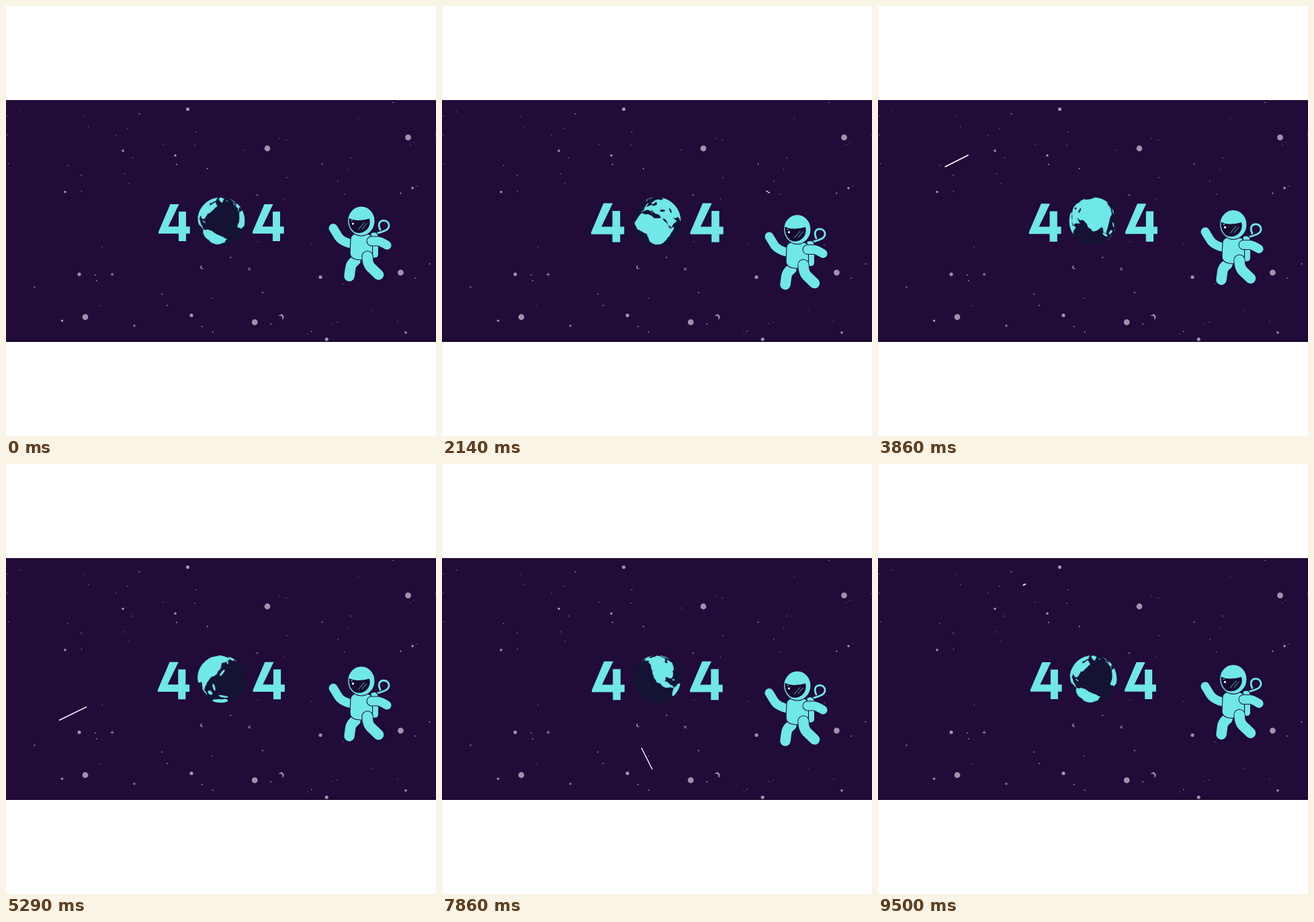
Animation, 640 px wide and 640 px high, one loop 9.57 s. Source, as an HTML page with a canvas:

```html
<!DOCTYPE html>
<html lang="en">
<head>
<meta charset="utf-8">
<title>404</title>
<style>
html, body { margin: 0; width: 100%; height: 100%; overflow: hidden; background: #fff; }
canvas { display: block; width: 640px; height: 640px; }
</style>
</head>
<body>
<canvas id="stage" width="640" height="640" role="img" aria-label="404"></canvas>
<script>
const LOOP = 9570, HALF = LOOP / 2, FPS = 14;
const SKY = '#210b38', TEAL = '#70e7e9', DARK = '#141334', GREY = '#a092ac';
const ctx = document.getElementById('stage').getContext('2d');

function layer(w, h) {
  const c = document.createElement('canvas');
  c.width = w;
  c.height = h;
  return c.getContext('2d', { willReadFrequently: true });
}
function seeded(seed) {
  return () => (seed = (seed * 16807) % 2147483647) / 2147483647;
}
const clamp = u => Math.max(0, Math.min(1, u));
const smooth = u => (u = clamp(u), u * u * (3 - 2 * u));
const mix = (p, q, k) => p.map((v, i) => v + (q[i] - v) * k);

// ---- sky ----
const sky = layer(640, 640);

function dot(g, x, y, r) {
  g.beginPath();
  g.arc(x, y, r, 0, 7);
  g.fill();
}
function cross(x, y, r, turn) {
  sky.save();
  sky.translate(x, y);
  sky.rotate(turn);
  sky.beginPath();
  sky.moveTo(-r, 0); sky.lineTo(r, 0);
  sky.moveTo(0, -r); sky.lineTo(0, r);
  sky.stroke();
  sky.restore();
}
function crescent(x, y, r, dx, dy) {
  sky.fillStyle = GREY;
  dot(sky, x, y, r);
  sky.fillStyle = SKY;
  dot(sky, x + dx, y + dy, r);
}
function paintSky() {
  sky.fillStyle = '#fff';
  sky.fillRect(0, 0, 640, 640);
  sky.fillStyle = SKY;
  sky.fillRect(0, 140, 640, 360);
  sky.fillStyle = '#1b0830';
  sky.fillRect(0, 497, 640, 3);
  sky.fillStyle = sky.strokeStyle = GREY;

  // large stars by radius
  const stars = {
    4.4: [[389, 212], [598.5, 195.7], [118, 463], [370.2, 470.6], [587.4, 396.8]],
    2.6: [[270.5, 153.5], [109, 399.3], [468, 403.5], [276, 460.4], [477.2, 496]],
    1.8: [[174, 215.5], [252, 222.5], [88, 276.7], [605, 271], [595, 486], [83.5, 468.5]]
  };
  for (const r in stars) for (const [x, y] of stars[r]) dot(sky, x, y, +r);

  const rand = seeded(404);
  for (let i = 0; i < 64; i++) dot(sky, rand() * 640, 142 + rand() * 354, .6 + .5 * rand() ** 2);

  cross(158, 399.5, 2.6, 0);
  cross(362, 391.5, 2.8, Math.PI / 4);
  cross(191, 476, 2, 0);
  crescent(409.5, 463.3, 4, -2, 1.7);
  crescent(292, 388.7, 2.7, 1.6, -.6);
}
paintSky();

// ---- globe: near perspective view of a flat map ----
const MAP_W = 1080, MAP_H = 540, SIZE = 216, RADIUS = 106;
const TILT = 27 * Math.PI / 180, EYE = 2.4, FIRST_LON = -46;
const map = layer(MAP_W, MAP_H);
const rough = seeded(77);

function mapPoint([lon, lat]) {
  const drift = 20 * Math.sin(Math.PI * clamp((lon + 20) / 240));
  return [(lon + drift + 180) * 3, (90 - lat) * 3];
}
// Splits a shore line into halves, shaking each middle point.
function shore(p, q, depth) {
  if (!depth) return [p];
  const shake = Math.hypot(q[0] - p[0], q[1] - p[1]) * .16;
  const mid = mix(p, q, .5).map(v => v + (rough() - .5) * shake * 2);
  return [...shore(p, mid, depth - 1), ...shore(mid, q, depth - 1)];
}
function land(...corners) {
  const line = corners.map(mapPoint);
  const edge = line.flatMap((p, i) => shore(p, line[(i + 1) % line.length], 2));
  for (const shift of [-MAP_W, 0, MAP_W]) {
    map.beginPath();
    for (const [x, y] of edge) map.lineTo(x + shift, y);
    map.fill();
  }
}
function spot(lon, lat, rx, ry, turn = 0) {
  map.beginPath();
  map.ellipse(...mapPoint([lon, lat]), rx * 3, ry * 3, turn, 0, 7);
  map.fill();
}
function paintMap() {
  // the Americas and Greenland
  land([-168, 66], [-158, 58], [-140, 60], [-124, 46], [-117, 32], [-105, 20], [-79, 7], [-88, 17],
    [-97, 22], [-95, 29], [-81, 26], [-75, 37], [-64, 45], [-56, 52], [-70, 62], [-80, 53],
    [-93, 59], [-68, 66], [-80, 78], [-110, 84], [-140, 70]);
  land([-44, 60], [-55, 70], [-65, 78], [-40, 84], [-20, 74]);
  land([-79, 8], [-62, 10], [-35, -7], [-48, -26], [-68, -52], [-71, -18], [-81, -5]);
  // Africa, Eurasia and Australia
  land([-6, 35], [10, 37], [20, 31], [32, 31], [43, 12], [51, 12], [40, -6], [35, -22], [20, -35],
    [12, -16], [9, 4], [-8, 5], [-17, 14]);
  land([-9, 37], [-2, 44], [-4, 48], [10, 55], [24, 56], [22, 64], [12, 56], [6, 60], [25, 71],
    [60, 71], [100, 86], [140, 82], [190, 67], [163, 60], [157, 51], [153, 59], [137, 54], [128, 39],
    [121, 31], [108, 19], [103, 3], [94, 17], [80, 10], [70, 22], [50, 29], [59, 21], [45, 13],
    [35, 30], [27, 37], [22, 38], [13, 45], [17, 39], [8, 44]);
  land([114, -22], [131, -12], [143, -12], [153, -27], [140, -38], [115, -34]);
  // islands
  spot(-2, 54, 2.4, 4.5);
  spot(-19, 65, 4, 1.7);
  spot(138, 37, 2, 7, .8);
  spot(114, 1, 4.5, 4.5);
  spot(101, 0, 2, 8, -.75);
  spot(122, 13, 2, 6, -.3);
  spot(140, -5, 9, 2.5, .35);
  spot(-79, 22, 4, 1, .3);
  // inland seas
  map.globalCompositeOperation = 'destination-out';
  spot(34, 43.5, 6, 2);
  spot(51, 42, 2.4, 4.5);
}
paintMap();

const texels = map.getImageData(0, 0, MAP_W, MAP_H).data;
const globe = layer(SIZE, SIZE), globeData = globe.createImageData(SIZE, SIZE);
const rays = [];

function castRays() {
  const spread = Math.sqrt(EYE * EYE - 1);
  for (let j = 0; j < SIZE; j++) {
    for (let i = 0; i < SIZE; i++) {
      const sx = (i + .5 - SIZE / 2) / RADIUS / spread, sy = (SIZE / 2 - j - .5) / RADIUS / spread;
      const q = 1 + sx * sx + sy * sy, root = EYE * EYE - q * (EYE * EYE - 1);
      if (root < 0) continue;
      const depth = (EYE - Math.sqrt(root)) / q;
      const x = sx * depth, y = sy * depth, z = EYE - depth;
      const lat = Math.asin(y * Math.cos(TILT) + z * Math.sin(TILT));
      const lon = Math.atan2(x, z * Math.cos(TILT) - y * Math.sin(TILT));
      const row = Math.min(MAP_H - 1, Math.floor((.5 - lat / Math.PI) * MAP_H));
      const at = (j * SIZE + i) * 4;
      rays.push([at, row * MAP_W, lon / (2 * Math.PI) * MAP_W]);
      globeData.data.set([112, 231, 233, 0], at);
    }
  }
}
castRays();

function drawGlobe(t) {
  const turn = ((FIRST_LON + 180) / 360 + t / LOOP + 1) * MAP_W;
  for (const [at, row, col] of rays) {
    globeData.data[at + 3] = texels[(row + Math.floor(turn + col) % MAP_W) * 4 + 3];
  }
  globe.putImageData(globeData, 0, 0);
  ctx.fillStyle = DARK;
  dot(ctx, 320.7, 320.3, 36);
  ctx.imageSmoothingQuality = 'high';
  ctx.drawImage(globe.canvas, 284, 284, 72, 72);
}

// ---- digits ----
const four = new Path2D(`M244.5 295H257.5L241.5 328.3H257V306H268V328.3H273.7V338.8H268
  V350H257V338.8H227V336Z`);

function drawDigits(swing) {
  const s = 1 + .06 * swing;
  ctx.save();
  ctx.translate(320, 322.5);
  ctx.scale(s, s);
  ctx.translate(-320, -322.5);
  ctx.fillStyle = TEAL;
  ctx.fill(four);
  ctx.translate(140, 0);
  ctx.fill(four);
  ctx.restore();
}

// ---- astronaut ----
const suit = {
  hose: new Path2D('M557 333C553 325 556 319.3 562 319.3C569 319.3 572 326 568.5 331C566 335.5 558 336 551 339'),
  pack: new Path2D('M543 338Q554 333 554.5 346V370Q554 375 549 375H543Z'),
  armL: new Path2D('M487 330.5L494 342Q499 351 516 354.5'),
  armR: new Path2D('M544 350H554Q558 350.5 567 356'),
  legL: new Path2D('M520 379Q513 384 512.5 391L511 402'),
  legR: new Path2D('M538 373Q538 384 543 389L554.5 400'),
  body: new Path2D('M513 346Q514 338 528 338Q545 338 545.5 347V368Q545 378 529 378Q512 378 512 367Z'),
  visor: new Path2D(`M510.5 316Q517 319.5 525 319Q534 318.5 541 316.5Q543.5 326 537 333
    Q528 341 518 336Q509.5 329 510.5 316Z`),
  shine: new Path2D('M524.5 332.5L533 322.5M530 332L537 323.5'),
  helmet: new Path2D()
};
suit.helmet.ellipse(528.8, 320, 20.2, 22, 0, 0, 7);

function limb(path, width) {
  ctx.lineWidth = width + 2;
  ctx.strokeStyle = SKY;
  ctx.stroke(path);
  ctx.lineWidth = width;
  ctx.strokeStyle = TEAL;
  ctx.stroke(path);
}
function plate(path) {
  ctx.fillStyle = TEAL;
  ctx.fill(path);
  ctx.lineWidth = 1.1;
  ctx.strokeStyle = SKY;
  ctx.stroke(path);
}
function drawAstronaut(swing) {
  ctx.save();
  ctx.translate(0, 14 * swing);
  ctx.lineCap = ctx.lineJoin = 'round';
  limb(suit.hose, 2.8);
  plate(suit.pack);
  limb(suit.armL, 13);
  limb(suit.legL, 15.5);
  plate(suit.body);
  limb(suit.legR, 15.5);
  limb(suit.armR, 13);
  plate(suit.helmet);
  ctx.fillStyle = '#170a2f';
  ctx.fill(suit.visor);
  ctx.strokeStyle = TEAL;
  ctx.lineWidth = .8;
  ctx.stroke(suit.shine);
  ctx.fillStyle = '#fff';
  dot(ctx, 516.4, 324, 1.6);
  dot(ctx, 514.8, 319.8, .8);
  ctx.restore();
}

// ---- shooting stars: path, head times, tail times, width ----
const meteors = [
  { from: [79, 381.5], to: [161, 341.5], head: [150, 850], tail: [820, 1210], width: 1.5 },
  { from: [464, 264], to: [488, 278.5], head: [1150, 1800], tail: [1528, 2428], width: 1.1 },
  { from: [281, 391], to: [313, 454.5], head: [2350, 3000], tail: [2600, 3550], width: 1.4 },
  { from: [99.5, 239.5], to: [220, 178.5], head: [3500, 4500], tail: [4040, 4800], width: 1.8 }
];
function drawMeteors(t) {
  ctx.strokeStyle = '#fff';
  ctx.lineCap = 'butt';
  for (const { from, to, head, tail, width } of meteors) {
    const [a, b] = [tail, head].map(([t0, t1]) => smooth((t - t0) / (t1 - t0)));
    if (b - a < .002) continue;
    ctx.lineWidth = width;
    ctx.beginPath();
    ctx.moveTo(...mix(from, to, a));
    ctx.lineTo(...mix(from, to, b));
    ctx.stroke();
  }
}

function draw(now) {
  const step = Math.floor((now % LOOP + 5) * FPS / 1000);
  const t = step * 1000 / FPS % LOOP;
  const phase = t % HALF;
  const swing = 1 - Math.abs(1 - 2 * phase / HALF);
  ctx.drawImage(sky.canvas, 0, 0);
  drawMeteors(phase);
  drawDigits(swing);
  drawGlobe(t);
  drawAstronaut(swing);
}
const start = performance.now();
function tick() {
  draw(performance.now() - start);
  requestAnimationFrame(tick);
}
tick();
</script>
</body>
</html>
```
